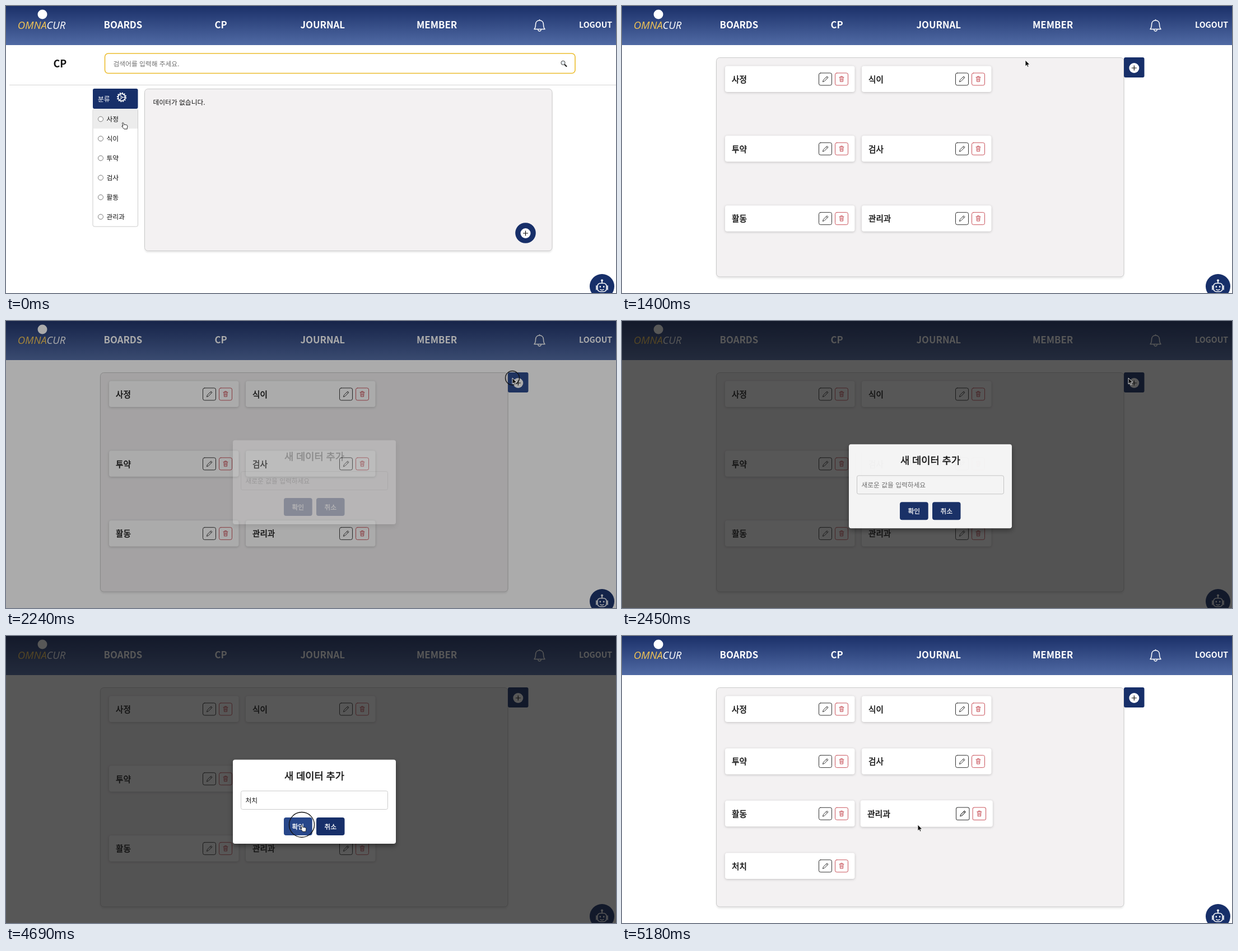
Recreate the animation shown at these times as an HTML page. Size 1089x514 px, loop 6.09 s.

```html
<!DOCTYPE html>
<html lang="ko">
<head>
<meta charset="utf-8">
<style>
  html, body { margin: 0; width: 100%; height: 100%; overflow: hidden; background: #fff; }
  svg { display: block; font: 11.75px "Noto Sans CJK KR", "Noto Sans CJK", sans-serif; fill: #111; }
  .navy { fill: #172f69; }
  .hot { fill: #28478a; }
  .white { fill: #fff; }
  .mid { text-anchor: middle; }
  .medium { stroke: #111; stroke-width: .45; }
  .medium.white { stroke: #fff; stroke-width: .3; }
  .line { fill: none; stroke-linecap: round; stroke-linejoin: round; }
  .nav { font-size: 16.8px; font-weight: 700; fill: #fff; }
  .panel { fill: #f3f1f2; stroke: #c9c9c9; filter: drop-shadow(0 3px 1px #0001); }
  .card rect:first-child { fill: #fff; filter: drop-shadow(0 1px 2px #0003); }
  .card text { font-size: 14.6px; }
  .hint { fill: #707070; }
</style>
</head>
<body>
<svg width="1089" height="514" viewBox="0 0 1089 514">
  <defs>
    <linearGradient id="sky" x2="0" y2="1">
      <stop stop-color="#1b3069"/><stop offset="1" stop-color="#506aa4"/>
    </linearGradient>
    <g id="plus">
      <circle r="9" class="white"/>
      <path d="M-4.5 0h9M0-4.5v9" stroke="#111" stroke-width="1.2"/>
    </g>
    <g id="tools" class="line">
      <rect x="167.5" y="12.5" width="23" height="22" rx="3" stroke="#333"/>
      <path d="M174.5 28l1-3 6.5-6.5 2 2-6.5 6.5zM180.5 20l2 2" stroke="#333"/>
      <rect x="196.5" y="12.5" width="23" height="22" rx="3" stroke="#c9545c"/>
      <path d="M204 20h8M206.5 19.5v-1h3v1M205 20.5l.5 7.5h5l.5-7.5M207 22v4M209 22v4" stroke="#c9545c"/>
    </g>
  </defs>

  <g id="listPage">
    <text x="84.5" y="110" font-size="18" font-weight="700">CP</text>
    <rect x="176.5" y="85" width="839.5" height="35.5" rx="6" fill="#fff" stroke="#ecbd2f" stroke-width="1.6"/>
    <text x="191.5" y="107.5" class="hint">검색어를 입력해 주세요.</text>
    <path d="M997.5 105l3 3" class="line" stroke="#222" stroke-width="2.2"/>
    <circle cx="994.5" cy="101.8" r="3.6" fill="#e4e9ee" stroke="#444"/>
    <path d="M6 141.5H1089" stroke="#d4d4d4"/>
    <rect x="155" y="184" width="80.5" height="211" rx="3" fill="#fff" stroke="#ccc"/>
    <rect id="rowHover" x="155.5" y="184" width="79.5" height="35.5" fill="#ececec"/>
    <rect x="155" y="148" width="80.5" height="36" rx="3" class="navy"/>
    <text x="164" y="171" class="white">분류</text>
    <g transform="translate(206.5 163.5)" class="line" stroke="#fff">
      <circle r="6.2" stroke-width="1.6"/>
      <circle r="7.7" stroke-width="1.9" stroke-dasharray="2.2 1.832" stroke-linecap="butt"/>
      <path d="M1.5 0H6M-.8-1.3L-3-5.2M-.8 1.3L-3 5.2" stroke-width="1.2"/>
      <circle r="1.6"/>
    </g>
    <g id="rows"></g>
    <rect x="247.5" y="148.5" width="727.5" height="290" rx="6" class="panel"/>
    <text x="262.5" y="176.5">데이터가 없습니다.</text>
    <circle cx="927.5" cy="406.5" r="18.3" class="navy"/>
    <use href="#plus" x="927.5" y="407"/>
  </g>

  <g id="cardPage">
    <rect x="168.5" y="92.5" width="727.5" height="392.5" rx="6" class="panel"/>
    <rect id="add" x="896" y="92" width="36.5" height="36" rx="3"/>
    <use href="#plus" x="914.3" y="111"/>
    <g id="cards"></g>
  </g>

  <rect width="1089" height="70" fill="url(#sky)"/>
  <circle cx="65" cy="15" r="8.5" class="white"/>
  <text x="63.5" y="41" class="white mid" font-family="Open Sans, sans-serif" font-size="18.5" font-style="italic" font-weight="500"><tspan fill="#f3c453">OMNA</tspan>CUR</text>
  <g class="nav">
    <text x="174.5" y="40">BOARDS</text>
    <text x="372.5" y="40">CP</text>
    <text x="525.5" y="40">JOURNAL</text>
    <text x="733" y="40">MEMBER</text>
    <text x="1023" y="39" font-size="14.2">LOGOUT</text>
  </g>
  <path d="M943 41.5c2-2 2.5-5 2.5-8.5 0-4.5 3-7.300 7-7.300s7 2.8 7 7.300c0 3.5.5 6.5 2.5 8.5zM949.8 42.5c.5 3.3 4.9 3.3 5.4 0M952.5 25.5v-1" class="line" stroke="#fff" stroke-width="1.5"/>
  <circle cx="1064" cy="502" r="22" class="navy"/>
  <g class="line" stroke="#fff" stroke-width="1.6">
    <path d="M1064 496v-3M1054 501v7M1074 501v7"/>
    <rect x="1056" y="496.5" width="16" height="15" rx="5"/>
    <path d="M1061 507.5q3 2.5 6 0"/>
    <path d="M1060.8 502.5v.5M1067.2 502.5v.5" stroke-width="2.5"/>
    <circle cx="1064" cy="491.5" r="1.2"/>
  </g>

  <rect id="shade" width="1089" height="514"/>
  <g id="dialog">
    <rect x="405" y="221.5" width="291" height="150.5" rx="4" fill="#fff" style="filter:drop-shadow(0 4px 4px #0006)"/>
    <text x="550.5" y="256.5" class="mid medium" font-size="17.6">새 데이터 추가</text>
    <rect x="419.5" y="277.5" width="262" height="33" rx="3" fill="#fff" stroke="#ccc"/>
    <text x="427.5" y="298.5" id="entry"></text>
    <path id="caret" d="M428 286v15" stroke="#111"/>
    <rect id="ok" x="496" y="325" width="50.7" height="32" rx="4"/>
    <rect x="554" y="325" width="50.5" height="32" rx="4" class="navy"/>
    <text x="521.3" y="345.8" class="mid medium white">확인</text>
    <text x="579.2" y="345.8" class="mid medium white">취소</text>
  </g>

  <g id="pointer">
    <circle id="ring" fill="none" stroke="#111" stroke-width="1.3"/>
    <path id="arrow" d="M0 0v11l2.6-2.3 1.5 3.6 1.9-.8-1.5-3.5h3.5z" stroke="#fff" stroke-width=".8"/>
    <path id="hand" d="M-1.5 1.5q1-1.5 2.2 0l1.5 3.5 1.5-.7 1.6.6 1.5.2q1.2 1 1.1 3l-.6 2.2v2h-5.5q-2.5-2.6-4-5.3.6-1.2 2.2.2z" fill="#fff" stroke="#111" stroke-width=".9"/>
    <path id="beam" d="M-2.5-6.5q2.5 0 2.5 1.5 0-1.5 2.5-1.5M0-5V5M-2.5 6.5q2.5 0 2.5-1.5 0 1.5 2.5 1.5M-1.5 1.5h3" class="line" stroke="#111"/>
  </g>
</svg>
<script>
const LOOP = 6090, STEP = 70;
const $ = id => document.getElementById(id);
const names = ['사정', '식이', '투약', '검사', '활동', '관리과', '처치'];

$('rows').innerHTML = names.slice(0, 6).map((name, i) =>
  `<circle cx="169" cy="${202.5 + 35 * i}" r="4.5" fill="#fff" stroke="#777"/>
   <text x="179.5" y="${207.2 + 35 * i}">${name}</text>`).join('');
$('cards').innerHTML = names.map(name =>
  `<g class="card"><rect width="231.5" height="46.5" rx="4"/>
   <text x="12" y="29.3" class="medium">${name}</text><use href="#tools"/></g>`).join('');
const cards = [...$('cards').children];

const path = [
  [140, 209, 208], [770, 216, 159], [1120, 216, 159], [1400, 720, 97], [1540, 721, 98],
  [2100, 904, 102], [2450, 904, 102], [2730, 577, 278], [4270, 577, 278], [4620, 528, 338]
];
const shapes = [
  [0, 'hand'], [840, 'arrow'], [2030, 'hand'], [2240, 'arrow'], [2660, 'beam'],
  [3640, ''], [4340, 'beam'], [4410, 'arrow'], [4550, 'hand'], [4760, 'arrow']
];
const typed = [[0, ''], [3640, 'ㅊ'], [3710, '처'], [3850, '처ㅊ'], [3920, '처치']];
const clicks = [[560, 770], [2170, 2380], [2800, 3080], [4690, 4830]];

const clamp = v => Math.max(0, Math.min(1, v));
const within = (t, from, to) => t >= from && t < to;
const latest = (list, t) => list.filter(([start]) => start <= t).pop()[1];
const show = (id, on) => $(id).style.display = on ? '' : 'none';

function position(t) {
  const next = path.findIndex(([time]) => time > t);
  if (next === 0) return path[0].slice(1);
  if (next < 0) return path[path.length - 1].slice(1);
  const [t0, ...a] = path[next - 1], [t1, ...b] = path[next];
  const u = (t - t0) / (t1 - t0), k = u * u * (3 - 2 * u);
  return a.map((v, i) => v + (b[i] - v) * k);
}

function draw(t) {
  const [x, y] = position(t), shape = latest(shapes, t), text = latest(typed, t);

  show('listPage', t < 910);
  show('cardPage', t >= 910);
  show('rowHover', t < 910 && y > 184);
  $('add').setAttribute('class', within(t, 2030, 2310) ? 'hot' : 'navy');

  const count = t < 4970 ? 6 : 7, rows = Math.ceil(count / 2);
  cards.forEach((card, i) => {
    const left = i % 2 ? 428 : 184, top = 107.5 + (i >> 1) * 374.5 / rows;
    const scale = i === 5 ? 1 + .02 * clamp((t - 4900) / 210) : 1;
    card.style.display = i < count ? '' : 'none';
    card.setAttribute('transform',
      `translate(${left + 116} ${top + 23}) scale(${scale}) translate(-116 -23)`);
  });

  const opening = 1 - (1 - clamp((t - 2210) / 400)) ** 3;
  const closing = clamp(1 - (t - 4690) / 210);
  $('shade').style.opacity = .7 * clamp((t - 2170) / 140) * closing;
  $('dialog').style.opacity = opening * closing;
  $('dialog').setAttribute('transform', `translate(0 ${-10 * (1 - opening)})`);
  $('entry').textContent = text || '새로운 값을 입력하세요';
  $('entry').setAttribute('class', text ? '' : 'hint');
  $('ok').setAttribute('class', t >= 4550 ? 'hot' : 'navy');
  $('caret').setAttribute('transform', `translate(${10.8 * text.length} 0)`);
  show('caret', within(t, 2870, 3500) || within(t, 3640, 4420));

  $('pointer').setAttribute('transform', `translate(${x} ${y})`);
  for (const id of ['arrow', 'hand', 'beam']) show(id, id === shape);
  const click = clicks.find(([from, to]) => within(t, from, to));
  show('ring', click);
  if (click) $('ring').setAttribute('r', 22.5 - 10 * clamp((t - click[0]) / STEP));
}

function tick() {
  draw(Math.floor(performance.now() % LOOP / STEP) * STEP);
  requestAnimationFrame(tick);
}
tick();
</script>
</body>
</html>
```
